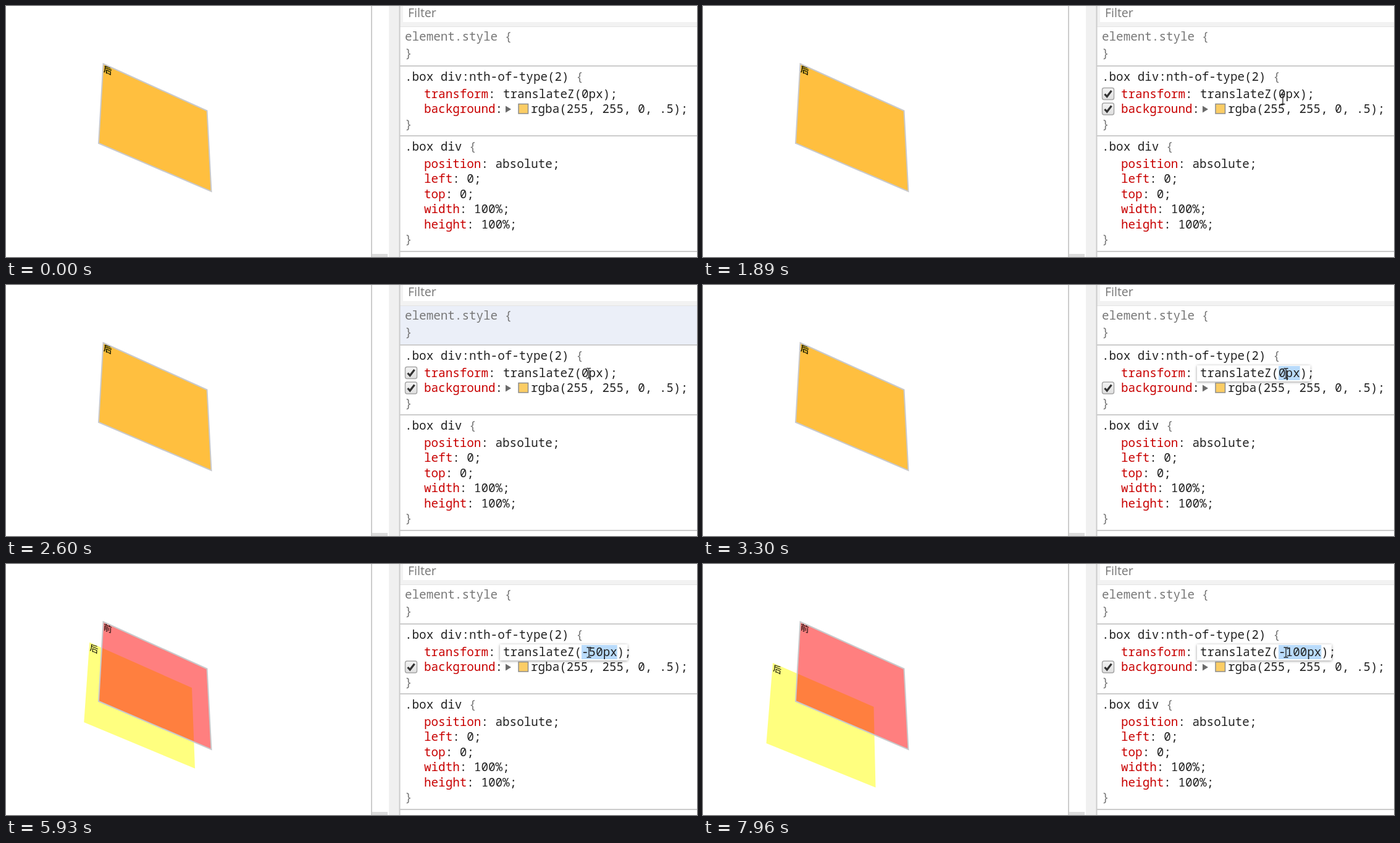
An HTML page for the animation above (8 s loop, 1119 px wide and 406 px high).

```html
<!DOCTYPE html>
<html lang="en">
<head>
<meta charset="utf-8">
<title>translateZ demo</title>
<style>
  html, body { margin: 0; width: 100%; height: 100%; overflow: hidden; background: #fff; }
  svg { display: block; }
  text { white-space: pre; }
  .code { font: 19.25px "Noto Sans Mono", "DejaVu Sans Mono", monospace; fill: #222; }
  .code .prop { fill: #c80000; }
  .code .dim { fill: #777; }
  .label { font: 16px "Noto Sans CJK SC", "Noto Sans CJK", sans-serif; }
  .filter { font: 19.5px "Open Sans", "Noto Sans", sans-serif; fill: #757575; }
  #click { mix-blend-mode: multiply; }
</style>
</head>
<body>
<svg width="1119" height="406" viewBox="0 0 1119 406">
  <defs>
    <linearGradient id="boxFill" x2="0" y2="1">
      <stop stop-color="#f4f4f4"/><stop offset="1" stop-color="#dedede"/>
    </linearGradient>
    <filter id="shadow" x="-10%" y="-40%" width="120%" height="190%">
      <feDropShadow dx="0" dy="1" stdDeviation="2" flood-opacity=".4"/>
    </filter>
    <g id="check">
      <rect x="-9.5" y="-9.5" width="19" height="19" rx="3" fill="url(#boxFill)" stroke="#a6a6a6" stroke-width="1.5"/>
      <path d="M-5.5 0.5L-1.8 4.5L5.5 -5" fill="none" stroke="#333" stroke-width="3.2"/>
    </g>
  </defs>

  <g id="scene">
    <g id="back"><path fill="#ff0" fill-opacity=".5"/><text class="label" x="1" y="14">后</text></g>
    <g id="front"><path fill="#f00" fill-opacity=".5"/><text class="label" x="1" y="14">前</text></g>
  </g>
  <path id="outline" fill="none" stroke="#c9c9cb" stroke-width="2"/>

  <path d="M592 0V406" stroke="#ccc" stroke-width="2"/>
  <rect x="593" y="401" width="25" height="5" fill="#dcdcdc"/>
  <rect x="620" width="17" height="406" fill="#f0f0f0"/>
  <path fill="#f2f2f2" d="M638 0H643V26H1119V33H638Z"/>
  <path d="M638 33.5H1119" stroke="#e4e4e4"/>
  <text class="filter" x="651" y="18">Filter</text>
  <rect id="focus" x="638" y="34" width="481" height="62" fill="#ebeff8"/>
  <path d="M637.5 0V406M638 97H1119M638 210H1119M638 397H1119" stroke="#ccc" stroke-width="2" fill="none"/>

  <g id="editor">
    <rect id="popup" x="800" y="130" height="26" fill="#fff" filter="url(#shadow)"/>
    <rect id="selection" y="131" height="23" fill="#b9dbfb"/>
  </g>
  <g id="code" class="code"></g>
  <path d="M809 161.5L818 167L809 172.5Z" fill="#6b6b6b"/>
  <rect x="830" y="158.5" width="15.5" height="15.5" fill="#fbcd65" stroke="#8c8c8c" stroke-width="1.5"/>
  <use id="checkTransform" href="#check" x="656" y="142"/>
  <use id="checkBackground" href="#check" x="656" y="166.5"/>
  <g id="checksBox"></g>

  <circle id="click" r="12" fill="#f4ee58"/>
  <path id="arrow" d="M0 0V16.5L3.8 13L6.6 19L9.2 17.8L6.5 12H11.5Z" fill="#fff" stroke="#222" stroke-width="1.2"/>
  <path id="beam" d="M-3.5 -8H-1L0 -7L1 -8H3.5M0 -7V7M-3.5 8H-1L0 7L1 8H3.5" fill="none" stroke="#222" stroke-width="1.3"/>
</svg>
<script>
const LOOP = 8000, CHAR = 11.55, VALUE_X = 805;
const $ = id => document.getElementById(id);
const show = (id, on) => $(id).style.display = on ? '' : 'none';
const place = (id, p) => $(id).setAttribute('transform', `translate(${p[0]} ${p[1]})`);

// Style rules
const span = (cls, s) => `<tspan class="${cls}">${s}</tspan>`;
const line = (x, y, s, id = '') => `<text x="${x}" y="${y}" id="${id}">${s}</text>`;
const prop = (y, name, value) =>
  line(677, y, span('prop', name) + ': ' + value);
const open = span('dim', ' {'), close = y => line(646, y, span('dim', '}'));

$('code').innerHTML = [
  line(646, 56, span('dim', 'element.style {')), close(83),
  line(646, 121, '.box div:nth-of-type(2)' + open),
  prop(149, 'transform', ''), line(VALUE_X, 149, '', 'value'),
  prop(173, 'background', ''), line(850, 173, 'rgba(255, 255, 0, .5);'), close(198),
  line(646, 234, '.box div' + open),
  prop(262, 'position', 'absolute;'), prop(286, 'left', '0;'), prop(310.5, 'top', '0;'),
  prop(335, 'width', '100%;'), prop(360, 'height', '100%;'), close(384)
].join('');

$('checksBox').innerHTML = [0, 1, 2, 3, 4]
  .map(i => `<use href="#check" x="656" y="${255 + i * 24.4}"/>`).join('');

// Corners of the plane at z = 0 and z = -100
const NEAR = [[157.5, 93.5], [325.5, 169.5], [332.5, 300], [150, 222]];
const FAR = [[113, 160], [276.5, 231], [279.5, 361.5], [102.5, 290]];
const mix = (a, b, k) => a.map((v, i) => v + (b[i] - v) * k);

function setPlane(id, k) {
  const quad = NEAR.map((p, i) => mix(p, FAR[i], k));
  const d = 'M' + quad.join('L') + 'Z';
  const [path, label] = $(id).children;
  path.setAttribute('d', d);
  label.setAttribute('transform', `matrix(.84 .36 -.05 .86 ${quad[0]})`);
  return d;
}
$('outline').setAttribute('d', setPlane('front', 0));

// Each entry lowers z by 10
const STEPS = [4770, 5080, 5310, 5630, 5860, 6320, 6640, 6940, 7490, 7960];

// Pointer path: time, x, y
const POINTER = [
  [70, 928, 406], [300, 885, 335], [560, 822, 252], [820, 791, 217], [890, 789, 213],
  [1200, 788, 211], [1400, 850, 192], [1660, 935, 163], [1740, 937, 160],
  [2050, 941, 141], [2280, 942, 141], [2670, 944, 143], [LOOP, 944, 143]
];
const ENTER = 70, INTO_BOX = 150, LEAVE_BOX = 1290, BEAM = 1640;
const CLICKS = [[2220, 2520], [2900, 3060]];
const FOCUS = [2240, 2670], EDIT = 2980, SELECT = 3140;
const within = (t, [a, b]) => t >= a && t < b;

function pointerAt(t) {
  const i = Math.max(1, POINTER.findIndex(p => p[0] > t));
  const [a, b] = [POINTER[i - 1], POINTER[i]];
  const k = Math.max(0, (t - a[0]) / (b[0] - a[0]));
  return mix(a.slice(1), b.slice(1), k);
}

function draw(t) {
  const n = STEPS.filter(s => t >= s).length;
  const z = n ? String(-10 * n) : '0';
  setPlane('back', n / 10);
  $('scene').append(n ? $('front') : $('back'));

  const value = `translateZ(${z}px)`;
  $('value').textContent = value + ';';
  $('popup').setAttribute('width', value.length * CHAR + 10);
  const start = t < SELECT ? 0 : 11;
  const end = t < SELECT ? value.length : value.length - 1;
  $('selection').setAttribute('x', VALUE_X + start * CHAR);
  $('selection').setAttribute('width', (end - start) * CHAR);

  const p = pointerAt(t);
  place('arrow', p);
  place('beam', p);
  place('click', [p[0] - 1, p[1] + 1]);

  show('editor', t >= EDIT);
  show('focus', within(t, FOCUS));
  show('checksBox', within(t, [INTO_BOX, LEAVE_BOX]));
  show('checkTransform', within(t, [LEAVE_BOX, EDIT]));
  show('checkBackground', t >= LEAVE_BOX);
  show('arrow', within(t, [ENTER, BEAM]));
  show('beam', t >= BEAM);
  show('click', CLICKS.some(c => within(t, c)));
}

function tick() {
  draw(performance.now() % LOOP);
  requestAnimationFrame(tick);
}
tick();
</script>
</body>
</html>
```
